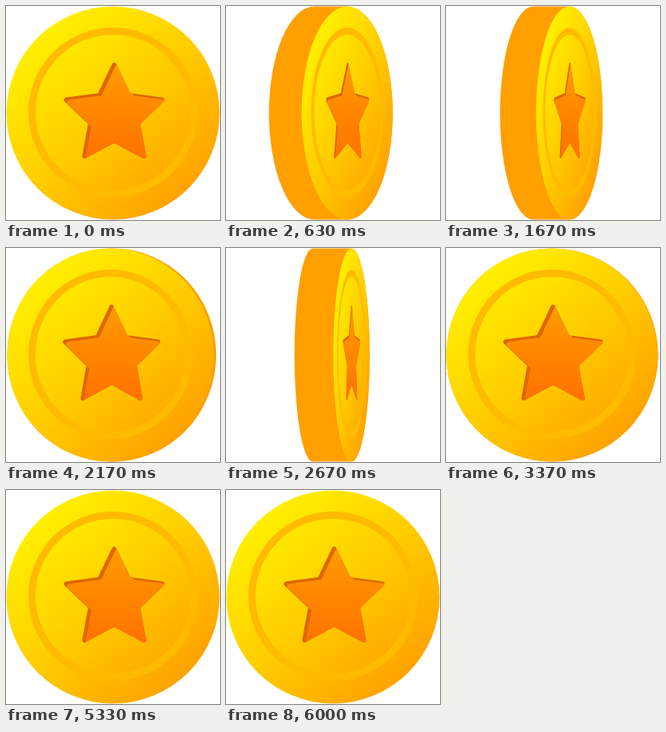
Recreate the animation shown at these times as an HTML page. Size 268x268 px, loop 7210 ms.

```html
<!DOCTYPE html>
<html lang="en">
<head>
<meta charset="utf-8">
<title>Spinning coin</title>
<style>
  html, body { margin: 0; width: 100%; height: 100%; overflow: hidden; background: #fff; }
  svg { display: block; width: 100%; height: 100%; }
</style>
</head>
<body>
<svg viewBox="0 0 268 268">
  <defs>
    <linearGradient id="gold" gradientUnits="userSpaceOnUse" x1="-90" y1="-100" x2="90" y2="100">
      <stop offset="0" stop-color="#fff000"/>
      <stop offset=".5" stop-color="#ffcd00"/>
      <stop offset="1" stop-color="#ffa200"/>
    </linearGradient>
    <linearGradient id="amber" gradientUnits="userSpaceOnUse" x1="0" y1="-63" x2="0" y2="56">
      <stop offset="0" stop-color="#ff9a00"/>
      <stop offset="1" stop-color="#ff7000"/>
    </linearGradient>
    <clipPath id="disc"><circle r="133.5"/></clipPath>
    <mask id="cut" maskUnits="userSpaceOnUse" x="-80" y="-80" width="160" height="160">
      <path class="star" fill="#fff" stroke="#fff"/>
    </mask>
  </defs>
  <path id="edge" fill="#ff9f00"/>
  <g id="face">
    <circle r="133.5" fill="url(#gold)"/>
    <g transform="translate(1.5 3)">
      <path class="star" fill="#dd6700" stroke="#dd6700"/>
      <g mask="url(#cut)">
        <path class="star" transform="translate(4 3)" fill="url(#amber)" stroke="url(#amber)"/>
      </g>
    </g>
    <g clip-path="url(#disc)">
      <rect id="shine" x="-150" width="300" height="108" transform="rotate(39.8)" fill="#fff5e4" fill-opacity=".45"/>
    </g>
    <circle cy="-1" r="101.5" fill="none" stroke="#ffbb00" stroke-width="9"/>
  </g>
</svg>
<script>
const LOOP = 7210, CENTER = 134, RADIUS = 133.5, DEPTH = 50;

// time (ms), angle (deg), speed (deg/ms)
const SPIN = [
  [30, 0, 0.05],
  [1170, 158.5, 0.185],
  [2170, 345.5, 0.188],
  [2670, 440, 0.175],
  [3370, 532, 0.08],
  [3530, 540, 0]
];

const $ = id => document.getElementById(id);
const edge = $('edge'), face = $('face'), shine = $('shine');

function starPath(outer, inner) {
  const points = Array.from({ length: 10 }, (_, i) => {
    const r = i % 2 ? inner : outer, a = i * Math.PI / 5;
    return (r * Math.sin(a)).toFixed(2) + ' ' + (-r * Math.cos(a)).toFixed(2);
  });
  return 'M' + points.join('L') + 'Z';
}

for (const star of document.querySelectorAll('.star')) {
  star.setAttribute('d', starPath(63, 31));
  star.setAttribute('stroke-width', 6);
  star.setAttribute('stroke-linejoin', 'round');
}

function spinAngle(t) {
  if (t <= SPIN[0][0]) return 0;
  const i = SPIN.findIndex(key => key[0] > t);
  if (i < 0) return 540;
  const [t0, a0, v0] = SPIN[i - 1], [t1, a1, v1] = SPIN[i];
  const span = t1 - t0, u = (t - t0) / span, w = 1 - u;
  return a0 * w * w * (1 + 2 * u) + a1 * u * u * (1 + 2 * w)
       + span * u * w * (v0 * w - v1 * u);
}

function draw(t) {
  const degrees = spinAngle(t);
  // Both sides look alike, so fold the angle into -90..90.
  const a = (degrees - 180 * Math.round(degrees / 180)) * Math.PI / 180;
  const scale = Math.max(Math.cos(a), 0.001), rx = RADIUS * scale;
  const half = DEPTH / 2 * Math.sin(a) ** 2 * Math.sign(a);
  const mid = CENTER - 3.5 * Math.abs(Math.sin(2 * a));
  const left = mid - Math.abs(half), right = mid + Math.abs(half);
  const top = CENTER - RADIUS, bottom = CENTER + RADIUS;

  edge.setAttribute('d', `M${left} ${top}H${right}A${rx} ${RADIUS} 0 0 1 ${right} ${bottom}` +
    `H${left}A${rx} ${RADIUS} 0 0 1 ${left} ${top}Z`);
  edge.style.display = Math.abs(half) > 0.01 ? '' : 'none';
  face.setAttribute('transform', `translate(${mid + half} ${CENTER}) scale(${scale} 1)`);

  shine.style.display = t > 3815 && t < 4640 ? '' : 'none';
  shine.setAttribute('y', -(124 + 0.4675 * (t - 4370)));
}

const start = performance.now();
function tick() {
  draw((performance.now() - start) % LOOP);
  requestAnimationFrame(tick);
}
tick();
</script>
</body>
</html>
```
